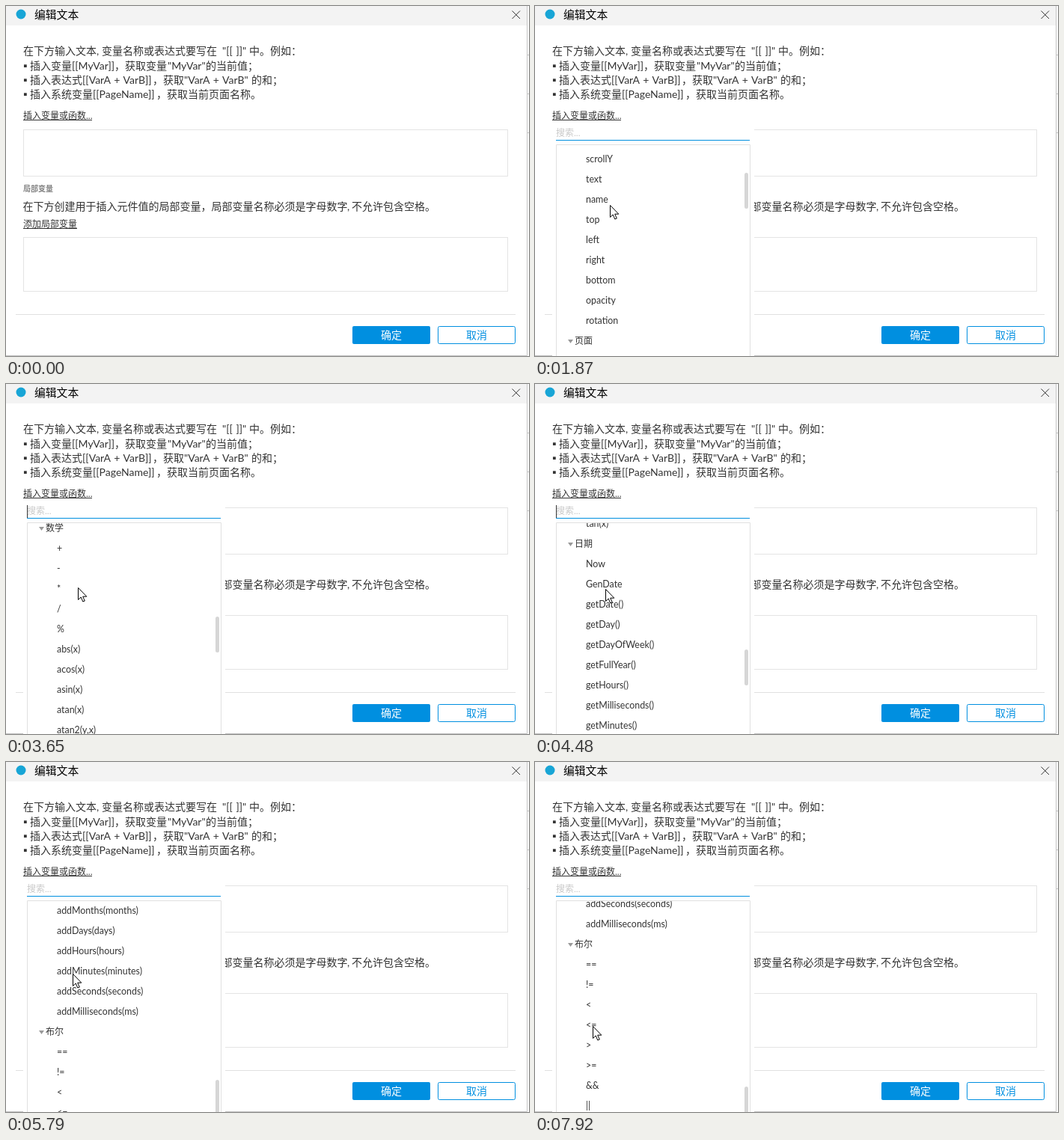
An HTML page for the animation above (7.99 s loop, 699 px wide and 468 px high).

```html
<!DOCTYPE html>
<html lang="zh-CN">
<head>
<meta charset="utf-8">
<style>
  html, body { margin: 0; width: 100%; height: 100%; overflow: hidden; background: #fff; }
  svg { display: block; width: 699px; height: 468px; }
  text { font-family: Lato, "Noto Sans CJK SC", "Noto Sans CJK", sans-serif; fill: #333; white-space: pre; }
  .body { font-size: 14px; word-spacing: 1.2px; }
  .link { font-size: 12px; }
  .item { font-size: 12.4px; }
  .head { font-size: 12px; }
  .field { fill: #fff; stroke: #e4e4e4; }
  .frame { fill: none; stroke: #c4c4c4; }
  .frame.active { stroke: #1a8fd8; }
  .hover text { fill: #008fe0; }
  .hover path { stroke: #008fe0; }
</style>
</head>
<body>
<svg viewBox="0 0 699 468">
  <defs><clipPath id="listClip"><rect x="29" y="186" width="258" height="282"/></clipPath></defs>
  <rect width="696" height="26" fill="#f3f3f3"/>
  <circle cx="20" cy="11" r="6.5" fill="#18a5d6"/>
  <text x="38" y="17" font-size="14.8" style="fill:#000">编辑文本</text>
  <path d="M676.5 6.5l10.5 10.5m0-10.5l-10.5 10.5" stroke="#333" fill="none"/>
  <g id="copy"></g>

  <g id="link">
    <text class="link" x="23" y="151">插入变量或函数...</text>
    <path d="M23 152.5H115" stroke="#333"/>
  </g>
  <rect class="field" x="23.5" y="165.5" width="647" height="62"/>
  <text x="23" y="248" font-size="10" font-weight="700" style="fill:#808080">局部变量</text>
  <text class="link" x="23" y="296">添加局部变量</text>
  <path d="M23 297.5H95" stroke="#333"/>
  <rect class="field" x="23.5" y="309.5" width="647" height="72"/>
  <path d="M13 412.5H681" stroke="#e0e0e0"/>

  <rect x="463" y="428" width="104" height="24" rx="2" fill="#008fe0"/>
  <text x="515" y="445" font-size="14" text-anchor="middle" style="fill:#fff">确定</text>
  <rect x="577.5" y="428.5" width="103" height="23" rx="2" fill="#fff" stroke="#008fe0"/>
  <text x="629" y="445" font-size="14" text-anchor="middle" style="fill:#008fe0">取消</text>
  <path id="frame" class="frame" d="M0 467.5H696.5V0M697 65.5h2M697 117.5h2M697 169.5h2"/>

  <g id="popup">
    <rect x="23" y="160" width="270" height="308" fill="#fff"/>
    <text x="28" y="174" font-size="12" style="fill:#c8c8c8">搜索...</text>
    <path d="M28 179.5H287" stroke="#008fe0"/>
    <path id="caret" d="M28.5 162V179" stroke="#333"/>
    <path d="M28.5 468V185.5H287.5V468" fill="none" stroke="#e0e0e0"/>
    <g clip-path="url(#listClip)">
      <g id="list"></g>
      <rect id="thumb" x="280" width="5" height="48" rx="2.5" fill="#d6d6d6"/>
    </g>
  </g>

  <g id="cursor" stroke="#000" fill="#fff" stroke-linejoin="round">
    <path id="arrow" d="M.5.5V16.5L4.2 13L6.8 19L9.3 18L6.7 12.2H11.8Z"/>
    <path id="hand" d="M-1.5 1.5Q0-1 1.5 1.5V7.5Q4 6 5 8.3Q7.5 7 8.3 9.3Q10.5 8.5 10.5 11V15Q10 17.5 8.5 19V21.5H-.5V19Q-3 16.5-6 12.5Q-6.5 10-4 10.5L-1.5 13ZM1.5 7.5V11M5 8.5V11.5M8.3 9.5V12"/>
  </g>
</svg>
<script>
const LOOP = 7990, ROW = 27;
const $ = id => document.getElementById(id);

function add(parent, tag, attrs, content = '') {
  const node = document.createElementNS('http://www.w3.org/2000/svg', tag);
  for (const name in attrs) node.setAttribute(name, attrs[name]);
  node.textContent = content;
  parent.append(node);
}

// Each paragraph: baseline, then x and text of every run.
const paragraphs = [
  [65, 23, '在下方输入文本', 121, ',', 128, '变量名称或表达式要写在', 289, '"[[ ]]"', 325, '中。例如：'],
  [85, 23, '▪', 32, '插入变量', 88, '[[MyVar]]', 145, '，获取变量', 216, '"MyVar"', 267, '的当前值；'],
  [104, 23, '▪', 32, '插入表达式', 102, '[[VarA + VarB]]', 196, '，获取', 238, '"VarA + VarB"', 328, '的和；'],
  [123, 23, '▪', 32, '插入系统变量', 116, '[[PageName]]', 201, '，获取当前页面名称。'],
  [273, 22.5, '在下方创建用于插入元件值的局部变量，局部变量名称必须是字母数字', 456, ',', 462, '不允许包含空格。'],
];
for (const [y, ...runs] of paragraphs)
  for (let i = 0; i < runs.length; i += 2)
    add($('copy'), 'text', { class: 'body', x: runs[i], y }, runs[i + 1]);

const groups = {
  '元件': 'This Target x y width height scrollX scrollY text name top left right bottom opacity rotation',
  '页面': 'PageName',
  '窗口': 'Window.width Window.height Window.scrollX Window.scrollY',
  '鼠标指针': 'Cursor.x Cursor.y DragX DragY TotalDragX TotalDragY DragTime',
  '数字': 'toExponential(decimalPoints) toFixed(decimalPoints) toPrecision(length)',
  '字符串': "length charAt(index) charCodeAt(index) concat('string') indexOf('searchValue') lastIndexOf('searchvalue') replace('searchvalue','newvalue') slice(start,end) split('separator',limit) substr(start,length) substring(from,to) toLowerCase() toUpperCase() trim() toString()",
  '数学': '+ - * / % abs(x) acos(x) asin(x) atan(x) atan2(y,x) ceil(x) cos(x) exp(x) floor(x) log(x) max(x,y) min(x,y) pow(x,y) random() sin(x) sqrt(x) tan(x)',
  '日期': 'Now GenDate getDate() getDay() getDayOfWeek() getFullYear() getHours() getMilliseconds() getMinutes() getMonth() getMonthName() getSeconds() getTime() getTimezoneOffset() getUTCDate() getUTCDay() getUTCFullYear() getUTCHours() getUTCMilliseconds() getUTCMinutes() getUTCMonth() getUTCSeconds() parse(datestring) toDateString() toISOString() toJSON() toLocaleDateString() toLocaleTimeString() toLocaleString() toTimeString() toUTCString() UTC(year,month,day) valueOf() addYears(years) addMonths(months) addDays(days) addHours(hours) addMinutes(minutes) addSeconds(seconds) addMilliseconds(ms)',
  '布尔': '== != < <= > >= && ||',
};
let rowY = 229;
const addItem = (name, y) => add($('list'), 'text', { class: 'item', x: 68, y: y + 4 }, name);
addItem('pageIndex', rowY - ROW);
for (const [title, names] of Object.entries(groups)) {
  add($('list'), 'path', { d: `M44 ${rowY - 2}h7l-3.5 5z`, fill: '#999' });
  add($('list'), 'text', { class: 'head', x: 53, y: rowY + 4 }, title);
  rowY += ROW;
  for (const name of names.split(' ')) {
    addItem(name, rowY);
    rowY += ROW;
  }
}

// Wheel notches of 120px; a repeated time is a double notch.
const notches = [1640, 1790, 2010, 2100, 2420, 2500, 2570, 3100, 3200, 3200, 3570, 3650, 3740,
  4020, 4100, 4100, 4480, 4580, 4960, 5060, 5150, 5250, 5430, 5480, 5790, 5880];
const scrollAt = t => Math.min(3117, 120 * notches.filter(n => t >= n).length);

const caretOn = [[830, 1640], [2190, 2640], [3200, 3740], [4250, 4730], [5250, 5790], [6340, 6890], [7400, 7920]];

// Pointer moves: start, end, number of jumps, destination x and y.
const moves = [
  [70, 680, 9, 91, 148], [1250, 1540, 5, 101, 240], [1640, 1870, 4, 100, 266],
  [2420, 2640, 4, 96, 272], [4020, 4100, 2, 94, 274], [4730, 4800, 2, 91, 278],
  [5430, 5480, 2, 89, 283], [6890, 7180, 5, 95, 380], [7260, 7520, 4, 76, 450],
  [7750, 7920, 3, 77, 353],
];
function pointerAt(t) {
  let x = 371, y = 383;
  for (const [start, end, count, toX, toY] of moves) {
    if (t < start) break;
    const jump = Math.floor((t - start) / (end - start) * (count - 1) + 1e-6) + 1;
    const p = Math.min(1, jump / count);
    x += (toX - x) * p;
    y += (toY - y) * p;
  }
  return [Math.round(x), Math.round(y)];
}

const show = (id, on) => { $(id).style.display = on ? '' : 'none'; };

function draw(t) {
  const scroll = scrollAt(t), [x, y] = pointerAt(t);
  const onLink = x >= 23 && x <= 115 && y >= 140 && y <= 154;
  show('popup', t >= 830);
  show('caret', caretOn.some(([from, to]) => t >= from && t < to));
  show('thumb', t >= 1480);
  show('cursor', t >= 70);
  show('hand', onLink);
  show('arrow', !onLink);
  $('link').setAttribute('class', onLink ? 'hover' : '');
  $('frame').setAttribute('class', t >= 830 && t < 1250 ? 'frame active' : 'frame');
  $('list').setAttribute('transform', `translate(0 ${-scroll})`);
  $('thumb').setAttribute('y', Math.round(205.4 + scroll * 0.0732));
  $('cursor').setAttribute('transform', `translate(${x} ${y})`);
}

const began = performance.now();
function tick() {
  draw((performance.now() - began) % LOOP);
  requestAnimationFrame(tick);
}
tick();
</script>
</body>
</html>
```
